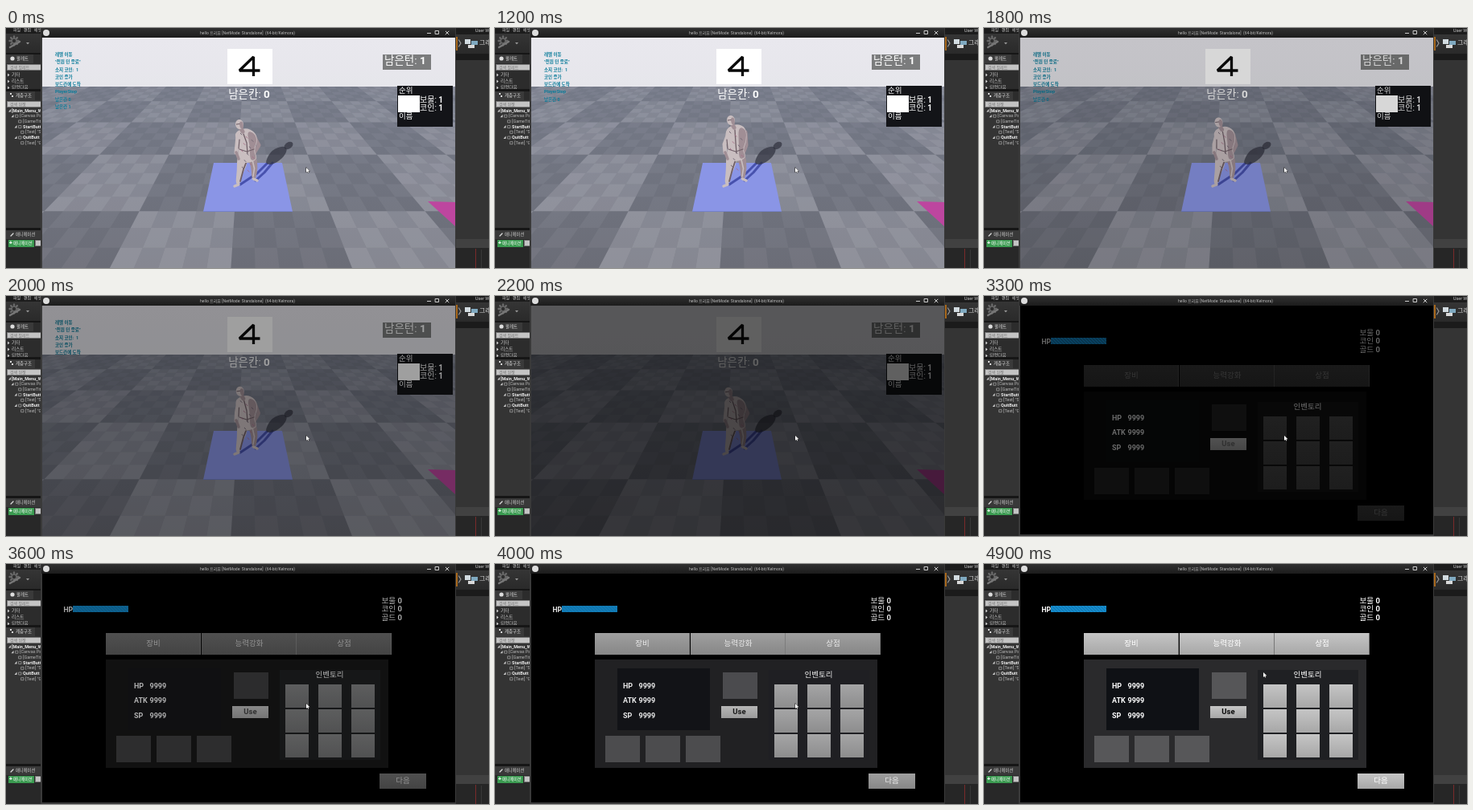
Recreate the animation shown at these times as an HTML page with a canvas. Size 600 by 299 pixels, loop 5000 ms.

```html
<!DOCTYPE html>
<html lang="ko">
<head>
<meta charset="utf-8">
<title>Game preview</title>
<style>
  html, body { margin: 0; width: 100%; height: 100%; overflow: hidden; background: #1b1b1b; }
  canvas { display: block; width: 600px; height: 299px; }
</style>
</head>
<body>
<canvas id="stage" width="600" height="299"></canvas>
<script>
const LOOP = 5000, STEP = 100;
const FONT = "Roboto, 'Noto Sans CJK KR', 'Noto Sans CJK', sans-serif";
const stage = document.getElementById('stage');
let ctx = stage.getContext('2d');

const smooth = (t, from, to) => {
  const u = Math.min(1, Math.max(0, (t - from) / (to - from)));
  return u * u * (3 - 2 * u);
};

function box(x0, y0, x1, y1, fill) {
  ctx.fillStyle = fill;
  ctx.fillRect(x0, y0, x1 - x0, y1 - y0);
}

function shade(x0, y0, x1, y1, top, bottom) {
  const g = ctx.createLinearGradient(0, y0, 0, y1);
  g.addColorStop(0, top);
  g.addColorStop(1, bottom);
  box(x0, y0, x1, y1, g);
}

function poly(points, fill) {
  ctx.beginPath();
  points.forEach(([x, y]) => ctx.lineTo(x, y));
  ctx.closePath();
  ctx.fillStyle = fill;
  ctx.fill();
}

// Closed soft outline guided by a few points
function blob(points, fill) {
  const mid = ([x, y], [u, v]) => [(x + u) / 2, (y + v) / 2];
  ctx.beginPath();
  ctx.moveTo(...mid(points[points.length - 1], points[0]));
  points.forEach((p, i) => ctx.quadraticCurveTo(...p, ...mid(p, points[(i + 1) % points.length])));
  ctx.fillStyle = fill;
  ctx.fill();
}

function oval(x, y, rx, ry, fill, turn = 0) {
  ctx.beginPath();
  ctx.ellipse(x, y, rx, ry, turn, 0, 7);
  ctx.fillStyle = fill;
  ctx.fill();
}

function limb(points, width, color) {
  ctx.beginPath();
  points.forEach(([x, y]) => ctx.lineTo(x, y));
  ctx.lineWidth = width;
  ctx.lineCap = ctx.lineJoin = 'round';
  ctx.strokeStyle = color;
  ctx.stroke();
}

function text(str, x, y, size, color = '#fff', align = 'left', weight = 400) {
  ctx.font = `${weight} ${size}px ${FONT}`;
  ctx.textAlign = align;
  ctx.textBaseline = 'middle';
  ctx.fillStyle = color;
  ctx.fillText(str, x, y);
}

// Hangul in regular weight followed by a bold number
function pair(label, value, x, y, size, align = 'left') {
  ctx.font = `700 ${size}px ${FONT}`;
  const valueWidth = ctx.measureText(value).width;
  ctx.font = `400 ${size}px ${FONT}`;
  const labelWidth = ctx.measureText(label).width;
  const total = labelWidth + valueWidth;
  const left = align === 'right' ? x - total : align === 'center' ? x - total / 2 : x;
  text(label, left, y, size);
  text(value, left + labelWidth, y, size, '#fff', 'left', 700);
}

function offscreen(draw) {
  const layer = document.createElement('canvas');
  layer.width = 600;
  layer.height = 299;
  const main = ctx;
  ctx = layer.getContext('2d');
  draw();
  ctx = main;
  return layer;
}

function searchBox(x0, y, x1) {
  box(x0, y - 4, x1, y + 4, '#777');
  box(x0 + 1, y - 3, x1, y + 3, '#c4c4c4');
}

function drawEditor() {
  box(0, 0, 600, 299, '#2c2c2c');

  box(0, 0, 44, 7, '#1c1c1c');
  text('파일   편집   에셋', 9, 2.5, 5, '#ccc');
  shade(0, 7, 44, 31, '#353535', '#2a2a2a');
  for (let i = 0; i < 4; i++) {
    const a = i * Math.PI / 4, dx = Math.cos(a) * 5.5, dy = Math.sin(a) * 5.5;
    limb([[10 - dx, 16 - dy], [10 + dx, 16 + dy]], 2.4, '#686868');
  }
  oval(10, 16, 2.2, 2.2, '#303030');
  limb([[5, 24], [17, 17]], 2.5, '#777');
  poly([[25, 18], [29, 18], [27, 20.5]], '#999');

  box(0, 31, 44, 33, '#161616');
  box(0, 33, 34, 44, '#3a3a3a');
  oval(8, 38, 2.6, 2.6, '#ddd');
  text('팔레트', 13, 38.5, 5.4, '#ddd');
  searchBox(1, 49, 44);
  text('검색 팔레트', 5, 49.3, 5, '#777');
  ['기타', '리스트', '되었다음'].forEach((s, i) => {
    const y = 58.5 + i * 8;
    poly([[2, y - 2], [4.5, y], [2, y + 2]], '#ccc');
    text(s, 7, y, 5.6, '#ccc');
  });
  box(0, 76, 44, 79, '#161616');

  box(0, 79, 36, 90, '#3a3a3a');
  box(5, 81, 7, 83, '#ddd');
  box(7, 84, 9, 86, '#ddd');
  text('계층구조', 12, 84, 5.4, '#ddd');
  box(0, 90, 44, 250, '#343434');
  searchBox(1, 95, 44);
  text('검색 위젯', 5, 95.3, 5, '#777');
  const rows = [
    ['[Main_Menu_W', 7, 700], ['[Canvas Pa', 17, 400], ['[GameTitl', 21, 400],
    ['StartButt', 21, 700], ['[Text] "S', 24, 400], ['QuitButt', 21, 700], ['[Text] "G', 24, 400]
  ];
  rows.forEach(([s, x, weight], i) => {
    const y = 103 + i * 6.7;
    if (i) {
      ctx.strokeStyle = '#aaa';
      ctx.lineWidth = 0.7;
      ctx.strokeRect(x - 5, y - 1.5, 3, 3);
    }
    if (i < 2 || s.includes('Butt')) {
      const ax = i ? x - 10.5 : 3;
      poly([[ax + 3, y - 2], [ax + 3, y + 1.5], [ax, y + 1.5]], '#ccc');
    }
    text(s, x, y, 5.5, weight === 700 ? '#eee' : '#bbb', 'left', weight);
  });

  box(0, 249, 44, 252, '#161616');
  box(0, 252, 44, 263, '#393939');
  limb([[6, 259], [9, 256]], 1.3, '#ddd');
  text('애니메이션', 12, 257.5, 5.3, '#ccc');
  box(0, 263, 44, 299, '#282828');
  box(3, 264, 35, 273, '#3a9a50');
  text('+', 4, 268, 7, '#fff', 'left', 700);
  text('애니메이션', 9, 268.5, 5.2);
  searchBox(36, 268, 44);

  box(559, 0, 600, 8, '#1c1c1c');
  text('User W', 583, 3, 5.4, '#ccc');
  shade(559, 8, 600, 32, '#353535', '#2a2a2a');
  box(559, 11, 561, 28, '#a8681c');
  limb([[562.5, 15], [565, 19], [562.5, 23]], 1.2, '#999');
  box(570, 14, 577, 20, '#d2dbe0');
  box(578, 16, 586, 21, '#7fa9c0');
  box(574, 21, 582, 25, '#d9d9d9');
  text('그래', 588, 19, 8, '#ccc');
  box(559, 32, 600, 40, '#1b1b1b');
  box(559, 40, 600, 266, '#343434');
  box(559, 263, 600, 274, '#414141');
  box(559, 274, 600, 299, '#262626');
  box(583, 275, 584, 299, '#7a2a2a');
  box(590, 276, 591, 299, '#383838');
}

function drawTitleBar() {
  box(43, 0, 559, 299, '#3a3a3a');
  shade(44, 0, 558, 12, '#303030', '#1c1c1c');
  oval(50, 6, 4, 4, '#ddd');
  text('hello 프리뷰 [NetMode: Standalone]  (64-bit/Kelmora)', 300, 6.5, 5.05, '#bbb', 'center');
  box(523, 6, 528, 7, '#ccc');
  ctx.strokeStyle = '#ccc';
  ctx.lineWidth = 1;
  ctx.strokeRect(533.5, 3.5, 4, 4);
  limb([[546, 4], [550, 8]], 1, '#ccc');
  limb([[550, 4], [546, 8]], 1, '#ccc');
}

// Ground plane point: u sideways in tile widths, d in depth
function ground(u, d) {
  const reach = 744 / d;
  return [300.5 + u * 0.4263 * reach, reach - 31];
}

function drawField() {
  shade(45, 12, 558, 74, '#e9e8ee', '#e6e6eb');
  shade(45, 73, 558, 299, '#757a88', '#6b6d77');
  ctx.save();
  ctx.beginPath();
  ctx.rect(45, 73, 513, 226);
  ctx.clip();
  // Five small cells to a slab, slabs alternating light and dark
  const cell = 0.214, perSlab = 5, left = -0.15, far = 7.15;
  for (let i = -30; i < 30; i++) {
    for (let j = 0; j < 24; j++) {
      const u = left + i * cell, d = far - j * cell;
      const bright = (Math.floor(i / perSlab) + Math.floor(j / perSlab)) & 1;
      const odd = (i + j) & 1;
      const near = j / 24;
      const glow = bright ? 0.09 + 0.12 * near + odd * 0.07 : odd * 0.05;
      poly([ground(u, d), ground(u + cell, d), ground(u + cell, d - cell), ground(u, d - cell)],
        `rgba(240,238,248,${glow})`);
    }
  }
  ctx.restore();
  poly([[258, 168], [343, 168], [356, 229], [245, 229]], '#8a95e6');
  box(245, 228, 356, 229, '#7481c9');
  poly([[524, 216], [558, 217], [558, 247]], '#bd469f');
}

function drawFigure(t) {
  const s = Math.cos(2 * Math.PI * t / 2400);
  const hx = 291.5 - 1.5 * s, hy = 117.5 + 2.5 * s;
  const light = '#c9bec0', mid = '#a08e95', dark = '#6f5f67';

  const legShadow = 'rgba(44,54,150,0.7)', shadow = 'rgba(48,50,62,0.72)';
  limb([[291, 195], [312, 181], [324, 169]], 3, legShadow);
  limb([[310, 190], [321, 180], [331, 168]], 3, legShadow);
  blob([[321, 170], [328, 154], [341, 147], [350, 149], [346, 160], [333, 170]], shadow);
  oval(351, 146.5, 6, 4, shadow, -0.6);

  const hip = 160 + s;
  blob([[299, hip - 4], [311, hip - 3], [313, 174], [310, 189], [305, 188], [305, 175]], mid);
  limb([[307.5, 188], [312, 190]], 3.4, light);
  limb([[306, 164], [308.5, 175], [307, 185]], 1.6, light);
  blob([[287, hip - 4], [301, hip - 3], [299, 172], [293, 183], [290, 196], [285, 194], [287, 178]], light);
  limb([[289, 195], [284, 197]], 3.4, light);
  limb([[299, hip + 5], [295, 176], [291, 191]], 1.8, dark);

  limb([[hx + 18, hy + 15], [313 + s, 146], [308, 156]], 5, mid);
  blob([[hx - 6, hy + 10], [hx + 7, hy + 4], [hx + 19, hy + 9], [313, 140], [308, 152],
    [313, hip + 3], [299, hip + 8], [286, hip + 4], [290, 150], [286, 139]], light);
  blob([[hx + 9, hy + 8], [hx + 19, hy + 11], [312, 141], [307, 152], [312, hip + 2], [303, hip + 5], [303, 146]], mid);
  limb([[hx + 5, hy + 12], [299, 143], [300, 156]], 1.3, dark);
  limb([[290, 151], [299, 154], [308, 151]], 1.3, dark);
  limb([[hx - 2, hy + 14], [286 + s, 145], [286, 155]], 5, light);
  limb([[286, 155], [289, 163]], 3.5, mid);
  limb([[289 + s, 139], [289, 150]], 1.2, dark);
  limb([[hx + 1, hy + 4], [hx + 4, hy + 9]], 5, mid);
  oval(hx, hy, 5, 6, light, -0.15);
  oval(hx + 2.5, hy + 1, 2.3, 4.5, mid, -0.15);
  limb([[hx - 4, hy], [hx, hy - 0.5]], 1, dark);

  for (let i = 0; i < 12; i++) {
    const x = 291 + (i * 7) % 17, y = 130 + i * 4.2 + s;
    limb([[x, y], [x + 2, y + 2]], 0.9, i % 2 ? '#a86f88' : '#6d6270');
  }
}

const messages = [
  ['레벨 이동', 2200], ['"전원 턴 종료"', 2200], ['소지 코인:  1', 2200], ['코인 증가', 2100],
  ['보드칸에 도착', 2100], ['PlayerStop', 2000], ['남은칸 0', 1900], ['남은칸 1', 700]
];

function drawHud(t) {
  messages.forEach(([s, end], i) => {
    if (t < end) text(s, 61, 33.5 + i * 9.25, 5.5, '#0b7c9a', 'left', 700);
  });

  box(275, 26, 331, 70, '#fff');
  ctx.beginPath();
  [[307.5, 60], [307.5, 36], [290, 53], [315.5, 53]].forEach(([x, y]) => ctx.lineTo(x, y));
  ctx.lineWidth = 3.3;
  ctx.lineCap = 'butt';
  ctx.lineJoin = 'bevel';
  ctx.strokeStyle = '#090909';
  ctx.stroke();

  pair('남은칸: ', '0', 302, 83, 13.5, 'center');
  box(468, 33, 528, 52, '#7b7c7d');
  pair('남은턴: ', '1', 470, 41.5, 13.5);

  box(486, 72, 555, 123, '#131418');
  text('순위', 488, 78.5, 9.5);
  box(487, 84, 514, 105, '#fff');
  pair('보물: ', '1', 514, 90, 10);
  pair('코인: ', '1', 514, 100, 10);
  text('이름', 488, 110, 9.5);
}

function button(x0, y0, x1, y1) {
  shade(x0, y0, x1, y1, '#c5c5c5', '#a7a7a7');
}

function drawMenu(alpha) {
  ctx.globalAlpha = alpha;
  [[124, 242, '장비'], [243, 361, '능력강화'], [361, 479, '상점']].forEach(([x0, x1, s]) => {
    button(x0, 86, x1, 113);
    box(x1 - 1, 86, x1, 113, '#777');
    text(s, (x0 + x1) / 2, 99, 9.5, '#fff', 'center');
  });
  box(124, 119, 475, 254, '#2a2a2c');
  box(152, 130, 267, 207, '#0f1115');
  box(283, 135, 326, 168, '#565658');
  [137, 187, 237].forEach(x => box(x, 214, x + 43, 247, '#575759'));
  box(340, 132, 465, 244, '#1f2023');
  for (let i = 0; i < 9; i++) {
    const x = 347 + (i % 3) * 41, y = 150 + Math.floor(i / 3) * 31;
    button(x, y, x + 29, y + 29);
  }
  button(464, 261, 522, 280);
  text('다음', 493, 270.5, 9.5, '#fff', 'center');

  // Labels brighten ahead of the panels
  ctx.globalAlpha = Math.pow(alpha, 0.45);
  button(281, 177, 326, 192);
  text('Use', 303.5, 184.5, 9.5, '#080808', 'center', 700);
  text('HP', 71.5, 57, 8.6, '#fff', 'left', 700);
  box(83, 52, 152, 60, '#168bcb');
  ctx.save();
  ctx.beginPath();
  ctx.rect(83, 52, 69, 8);
  ctx.clip();
  for (let x = 76; x < 152; x += 4) limb([[x, 52], [x + 8, 60]], 0.8, '#0d70aa');
  ctx.restore();
  ['보물 ', '코인 ', '골드 '].forEach((s, i) => pair(s, '0', 492, 46 + i * 10.6, 9.6, 'right'));
  ['HP', 'ATK', 'SP'].forEach((s, i) => {
    const y = 152 + i * 18.5;
    text(s, 159, y, 9, '#fff', 'left', 700);
    text('9999', 178.5, y, 9, '#fff', 'left', 700);
  });
  text('인벤토리', 402, 138, 9.5, '#fff', 'center');
  ctx.globalAlpha = 1;
}

function drawCursor(t) {
  const u = t < 4800 ? 0 : t < 4900 ? 0.5 : 1;
  const x = 373 - 26 * u, y = 174 - 39 * u;
  const shape = [[0, 0], [0, 6], [1.4, 4.7], [2.3, 6.5], [3.2, 6], [2.3, 4.2], [4.3, 4.2]]
    .map(([dx, dy]) => [x + dx, y + dy]);
  limb([...shape, shape[0]], 1, '#222');
  poly(shape, '#fff');
}

const frameLayer = offscreen(() => { drawEditor(); drawTitleBar(); });
const fieldLayer = offscreen(drawField);

function render(t) {
  ctx.drawImage(frameLayer, 0, 0);
  if (t < 2700) {
    ctx.drawImage(fieldLayer, 0, 0);
    drawFigure(t);
    drawHud(t);
    box(45, 12, 558, 299, `rgba(0,0,0,${smooth(t, 1500, 2700)})`);
  } else {
    box(45, 12, 558, 297, '#000');
    drawMenu(smooth(t, 2980, 4400));
  }
  drawCursor(t);
}

const start = performance.now();
function tick() {
  const t = (performance.now() - start) % LOOP;
  render(Math.floor(t / STEP) * STEP);
  requestAnimationFrame(tick);
}
tick();
</script>
</body>
</html>
```
